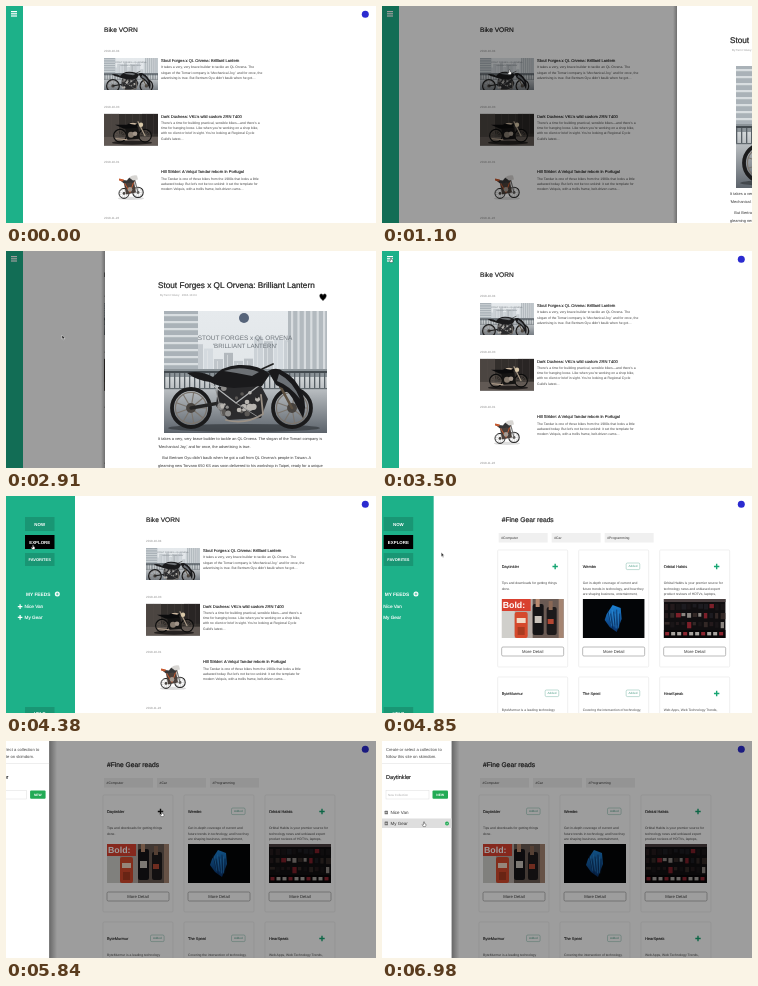
An HTML page for the animation above (8.32 s loop, 370 by 217 pixels).

```html
<!DOCTYPE html>
<html lang="en">
<head>
<meta charset="utf-8">
<title>Feed reader</title>
<style>
html, body { margin: 0; width: 100%; height: 100%; overflow: hidden; background: #fff; }
svg { display: block; }
#stage { width: 100vw; height: 100vh; }
text { font-family: "Liberation Sans", Arial, sans-serif; text-rendering: geometricPrecision; white-space: pre; }
</style>
</head>
<body>
<svg id="stage" viewBox="0 0 370 217" preserveAspectRatio="none"></svg>
<script>
const GREEN = '#1db189', PLUS = '#17a673';

// Markup helpers
const text = (x, y, size, str, fill = '#333', more = '') =>
  `<text x="${x}" y="${y}" font-size="${size}" fill="${fill}" ${more}>${str}</text>`;
const medium = (x, y, size, str, fill = '#222') =>
  text(x, y, size, str, fill, `stroke="${fill}" stroke-width="${size * 0.028}"`);
const mid = (x, y, size, str, fill, more = '') =>
  text(x, y, size, str, fill, `text-anchor="middle" ${more}`);
const lines = (x, y, step, size, rows, fill) =>
  rows.map((s, i) => text(x, y + i * step, size, s, fill)).join('');
const rect = (x, y, w, h, fill, more = '') =>
  `<rect x="${x}" y="${y}" width="${w}" height="${h}" fill="${fill}" ${more}/>`;
const circle = (x, y, r, fill, more = '') =>
  `<circle cx="${x}" cy="${y}" r="${r}" fill="${fill}" ${more}/>`;
const path = (d, fill, more = '') => `<path d="${d}" fill="${fill}" ${more}/>`;
const line = (d, color, w) => path(d, 'none', `stroke="${color}" stroke-width="${w}" stroke-linecap="round"`);
const group = (id, body, more = '') => `<g id="${id}" ${more}>${body}</g>`;
const repeat = (n, fn) => Array.from({ length: n }, (_, i) => fn(i)).join('');
const picture = (x, y, w, h, vw, vh, body) =>
  `<svg x="${x}" y="${y}" width="${w}" height="${h}" viewBox="0 0 ${vw} ${vh}" preserveAspectRatio="xMidYMid slice">${body}</svg>`;

let seed = 7;
const rnd = () => (seed = seed * 16807 % 2147483647) / 2147483647;

function wheel(x, y, r, tyre, rim) {
  return circle(x, y, r, 'none', `stroke="${tyre}" stroke-width="${r * 0.2}"`) +
    circle(x, y, r * 0.82, 'none', `stroke="${rim}" stroke-width="${r * 0.06}"`) +
    repeat(9, i => {
      const a = i * Math.PI * 2 / 9;
      return line(`M${x} ${y}l${r * 0.82 * Math.cos(a)} ${r * 0.82 * Math.sin(a)}`, rim, r * 0.06);
    }) + circle(x, y, r * 0.26, '#47433f');
}

function cityBike() {
  const towers = repeat(17, i => {
    const h = 16 + rnd() * 26, g = 178 + Math.round(rnd() * 34);
    return rect(i * 10, 66 - h, 9, h, `rgb(${g},${g + 6},${g + 11})`) +
      rect(i * 10 + 3, 68 - h, 1, h, '#e4e8ea', 'opacity=".6"');
  });
  const engine = repeat(26, () => {
    const x = 56 + rnd() * 38, y = 76 + rnd() * 28;
    return circle(x, y, 1.2 + rnd() * 2.6, ['#8d8c8a', '#2a2929', '#5b5855', '#b9b6b1'][Math.floor(rnd() * 4)]);
  });
  return rect(0, 0, 163, 122, 'url(#sky)') + towers +
    rect(0, 0, 34, 64, '#aab2b8') + rect(124, 0, 39, 64, '#b3babf') +
    repeat(9, i => rect(0, 3 + i * 7, 34, 2.2, '#d9dee1')) +
    repeat(6, i => rect(127 + i * 6.4, 0, 2.2, 64, '#d8dcdf')) +
    rect(0, 58, 163, 8, '#8b9398') + rect(0, 66, 163, 56, 'url(#road)') +
    repeat(33, i => rect(i * 5, 61, 1.3, 17, '#575f65')) +
    rect(0, 60, 163, 2, '#434a4f') + rect(0, 77, 163, 1.2, '#636b70') +
    circle(80, 7, 5, '#56647a') +
    mid(81, 29, 6.45, 'STOUT FORGES x QL ORVENA', '#6d747a') +
    mid(81, 36.6, 6.2, "'BRILLIANT LANTERN'", '#6d747a') +
    '<ellipse cx="80" cy="117" rx="76" ry="4" fill="#34383c" opacity=".7"/>' +
    wheel(27, 97, 19, '#1b1b1c', '#7b756e') + wheel(128, 97, 19, '#1b1b1c', '#7b756e') +
    line('M27 97L56 92L66 82', '#242424', 3.4) + line('M128 97L108 60', '#5d5142', 2.6) +
    path('M54 76L96 73L104 88L97 107L64 109L52 95Z', '#2b2b2d') + engine +
    line('M62 109Q82 114 99 103L97 84', '#9b9186', 1.8) + line('M46 72L72 92L101 70', '#b4b6b7', 1.2) +
    line('M52 79L58 104M72 92L94 106', '#8c8c8c', 1) +
    path('M23 62Q36 59 49 66Q58 55 74 54Q94 53 106 63L98 75L70 77Q54 76 46 71Q34 70 23 62Z', '#1a1a1c') +
    path('M60 60Q76 54 95 61L88 65Q74 62 60 60Z', '#6d7175') +
    path('M104 60Q113 55 120 61Q132 66 139 84Q143 96 139 107L132 94Q126 79 112 74Z', '#19191b') +
    path('M115 63Q129 70 136 88Q126 75 113 70Z', '#6b7075') + line('M98 58L109 53', '#222', 1.8);
}

function darkBike() {
  return rect(0, 0, 54, 32, '#332f2c') + rect(0, 0, 15, 23, '#4b4541') + rect(38, 0, 16, 20, '#292524') +
    repeat(8, i => rect(i * 7, 0, 0.5, 22, '#5a524c', 'opacity=".5"')) + rect(0, 23, 54, 9, '#615954') +
    '<ellipse cx="28" cy="29" rx="20" ry="2" fill="#24201f"/>' +
    wheel(16, 22, 6.3, '#0c0c0c', '#6b6157') + wheel(41, 22, 6.3, '#0c0c0c', '#6b6157') +
    line('M41 22L34 8', '#a99a87', 1.2) + path('M21 14L34 13L36 25L23 26Z', '#151413') +
    circle(27, 21, 3, '#877c70') + circle(31, 20, 2.3, '#a3968a') +
    path('M11 11L23 11Q27 7 34 10L33 14L20 15Z', '#0b0b0c') +
    path('M25 10Q29 8 33 10L31 11Z', '#c9b59e') + circle(37, 11, 2.2, '#d8c7a8') +
    line('M23 26L12 25', '#b7a48f', 1);
}

function whiteBike() {
  return rect(0, 0, 54, 32, '#fff') + '<ellipse cx="27" cy="29" rx="13" ry="1.6" fill="#ddd"/>' +
    wheel(20, 24, 5, '#222', '#999') + wheel(34, 23, 5.2, '#222', '#999') +
    line('M34 23L30 8', '#777', 1.2) + path('M20 14L30 12L32 23L22 25Z', '#4a403b') +
    line('M20 13L26 23L30 12', '#c65a30', 1) + circle(26, 20, 2.3, '#a69b92') +
    path('M15 10L23 11Q26 6 32 8L30 13L20 14Z', '#353536') +
    path('M25 8Q29 5 33 6L34 10L29 11Z', '#d7d5d2') + path('M15 9L20 10L19 12L15 11Z', '#c65a30');
}

const TITLE = 'Stout Forges x QL Orvena: Brilliant Lantern';

const posts = [
  ['2018-10-04', TITLE, ['It takes a very, very brave builder to tackle an QL Orvena. The',
    'slogan of the Tomari company is ‘Mechanical Joy,’ and for once, the',
    'advertising is true. But Bertram Oyu didn’t baulk when he got…'], cityBike, 163, 122],
  ['2018-10-03', 'Dark Duchess: VKL’s wild custom ZRN T400', [
    'There’s a time for building practical, sensible bikes—and there’s a',
    'time for hanging loose. Like when you’re working on a shop bike,',
    'with no client or brief in sight. You’re looking at Regional Cycle', 'Guild’s latest…'], darkBike, 54, 32],
  ['2018-10-01', 'Hill Strider: A Velqui Tandar reborn in Portugal', [
    'The Tandar is one of those bikes from the 1980s that looks a little',
    'awkward today. But let’s not be too unkind: it set the template for',
    'modern Velquis, with a trellis frame, belt-driven cams…'], whiteBike, 54, 32]
];

const feed = () => medium(98, 26, 6.6, 'Bike VORN') +
  posts.map(([date, title, rows, pic, w, h], i) => {
    const y = i * 55.7;
    return text(98, 46 + y, 3, date, '#8a8a8a') + picture(98, 52 + y, 54, 32, w, h, pic()) +
      medium(155, 55.8 + y, 4.1, title) + lines(155, 62.3 + y, 5.2, 3.4, rows, '#444');
  }).join('') + text(98, 212.8, 3, '2018-11-26', '#8a8a8a');

const heart = 'M218 49.5C214 46.5 214.2 43 216.2 43Q217.4 43 218 44.4Q218.6 43 219.8 43C221.8 43 222 46.5 218 49.5Z';

const article = () => rect(-4, 0, 4, 217, 'url(#shade)') + rect(0, 0, 275, 217, '#fff') +
  medium(53, 37, 8.2, TITLE) + text(55, 45, 2.9, 'By Tarn Holvey   2018-10-04', '#999') +
  path(heart, 'none', 'id="heart" stroke="#222" stroke-width=".6"') +
  picture(59, 60, 163, 122, 163, 122, cityBike()) +
  lines(53, 189.4, 7.1, 3.92, [
    'It takes a very, very brave builder to tackle an QL Orvena. The slogan of the Tomari company is',
    '‘Mechanical Joy,’ and for once, the advertising is true.'], '#333') +
  lines(53, 208.4, 7.1, 3.92, [
    '    But Bertram Oyu didn’t baulk when he got a call from QL Orvena’s people in Taiwan. A',
    'gleaming new Torvano 650 KS was soon delivered to his workshop in Taipei, ready for a unique'], '#333');

// Explore page
const pics = [
  () => rect(0, 0, 62, 39, '#b5aaa4') + rect(0, 11, 13, 28, '#d0cfcb') + rect(31, 0, 31, 39, '#6a5a53') +
    rect(0, 0, 29, 12, '#d9402f') + text(1, 8.8, 8.8, 'Bold:', '#fff', 'font-weight="bold"') +
    rect(13, 13, 13, 26, '#d5492c', 'rx="2"') + rect(15, 19, 9, 5, '#f2d9c5') + rect(16, 28, 7, 8, '#a93b20') +
    rect(31, 5, 11, 31, '#151416', 'rx="2"') + rect(34, 0, 4, 8, '#b98b70') +
    rect(45, 8, 10, 28, '#1d1a1b', 'rx="2"') + rect(47, 2, 4, 9, '#8a6855') +
    rect(33, 17, 7, 7, '#c9c2ba') + rect(46, 20, 6, 5, '#b34733') + rect(57, 0, 5, 39, '#a58572'),
  () => rect(0, 0, 62, 39, '#030507') + path('M24 15L30 6L38 9L39 20L34 33L27 28L22 21Z', 'url(#glow)') +
    repeat(9, i => line(`M${25 + i * 1.5} ${11 + (i % 3) * 2}l${3 - i * 0.4} ${13 + (i % 4)}`, i % 2 ? '#3a9be0' : '#061b3c', 0.5)),
  () => rect(0, 0, 62, 39, '#100e10') + rect(0, 0, 62, 3, '#4a3f40') +
    repeat(33, i => rect(1 + (i % 11) * 5.6, 5 + Math.floor(i / 11) * 9, 3 + rnd() * 2, 2.5 + rnd() * 4,
      ['#241a1c', '#7c1f29', '#1c1b20', '#8b8580', '#332826', '#191517'][Math.floor(rnd() * 6)])) +
    rect(0, 31, 62, 8, '#080708') + repeat(10, i => rect(1.5 + i * 6, 33, 4, 3.4, i % 3 ? '#a8a39e' : '#8d2630'))
];

const cards = [
  ['Daytinkler', ['Tips and downloads for getting things', 'done.']],
  ['Wembo', ['Get in-depth coverage of current and', 'future trends in technology, and how they', 'are shaping business, entertainment,']],
  ['Orbital Habits', ['Orbital Habits is your premier source for', 'technology news and unbiased expert', 'product reviews of HDTVs, laptops,']],
  ['ByteMurmur', ['ByteMurmur is a leading technology']],
  ['The Spool', ['Covering the intersection of technology,']],
  ['HearSpeak', ['Web Apps, Web Technology Trends,']]
];

const plus = (x, y) => path(`M${x - 2.7} ${y}h5.4M${x} ${y - 2.7}v5.4`, 'none', `stroke="${PLUS}" stroke-width="1.4"`);
const badge = (x, y) => rect(x, y, 13.6, 6.6, '#fff', 'rx="1.3" stroke="#5da892" stroke-width=".4"') +
  mid(x + 6.8, y + 4.4, 3, 'Added', '#4b9c85');

const card = ([name, rows], i) => {
  const x = 101 + (i % 3) * 81, y = i > 2 ? 127 : 0;
  const mark = i === 0 ? group('add', plus(154.5, 70.5)) + group('added', badge(144.5, 67))
    : i % 3 === 2 ? plus(x + 53, 70.5 + y) : badge(x + 43.5, 67 + y);
  return rect(x - 4, 54 + y, 70, 117, '#fff', 'rx="1" stroke="#e6e6e6" stroke-width=".6"') +
    medium(x, 71.8 + y, 3.9, name) + mark + lines(x, 87.8 + y, 5.7, 3.35, rows, '#444') +
    (i > 2 ? '' : picture(x, 103, 62, 39, 62, 39, pics[i]())) +
    rect(x, 151 + y, 62, 9, '#fff', 'rx="1.3" stroke="#777" stroke-width=".5"') +
    mid(x + 31, 157.1 + y, 4.2, 'More Detail', '#333');
};

const explore = () => medium(101, 25.5, 6.7, '#Fine Gear reads') +
  ['#Computer', '#Car', '#Programming'].map((s, i) =>
    rect(98 + i * 53, 37, 49, 9.5, '#f0f0f0') + text(100.5 + i * 53, 43, 3.4, s, '#333')).join('') +
  cards.map(card).join('');

// Side menu
const button = (y, h, label, more = '') => rect(19, y, 29.5, h, '#199674', more) +
  mid(33.7, y + h / 2 + 1.6, 4.4, label, '#fff', 'font-weight="bold"');
const arrow = y => path(`M11.8 ${y}h4.6M14.1 ${y - 2.3}v4.6`, 'none', 'stroke="#fff" stroke-width="1.2"');

const menu = () => button(21, 14, 'NOW') + button(39, 14, 'EXPLORE', 'id="pick"') +
  rect(19, 57, 29.5, 13, '#199674') + mid(33.7, 65, 4, 'FAVORITES', '#fff', 'font-weight="bold"') +
  text(20, 99.8, 4.8, 'MY FEEDS', '#fff', 'font-weight="bold"') +
  circle(51.3, 98, 2.5, '#fff') + path('M49.9 98h2.8M51.3 96.6v2.8', 'none', `stroke="${GREEN}" stroke-width=".7"`) +
  arrow(110.6) + medium(18.5, 112.4, 4.7, 'Nice Van', '#fff') +
  arrow(121.4) + medium(18.5, 123.2, 4.7, 'My Gear', '#fff') + button(211, 13, 'HELP');

const bars = () => repeat(3, i => rect(5, 5 + i * 2.2, 6, 1.2, '#fff'));

// Collection panel
const folder = y => rect(2.6, y - 1.8, 3.4, 3.6, '#777', 'rx=".5"') + rect(3.3, y - 0.4, 2, 0.5, '#fff');
const panel = () => rect(69.5, 0, 8, 217, 'url(#edge)') + rect(0, 0, 69.5, 217, '#fff') +
  lines(4, 10.4, 6.7, 4.15, ['Create or select a collection to', 'follow this site on skimdom.'], '#444') +
  rect(0, 22, 69.5, 0.5, '#ddd') + medium(4, 37.6, 5.6, 'Daytinkler') +
  rect(4, 49.5, 43, 8.5, '#fff', 'stroke="#ddd" stroke-width=".5"') + text(6, 54.8, 3, 'New Collection', '#aaa') +
  rect(50.5, 49.5, 15.5, 8.3, '#22ab55', 'rx="1"') + mid(58.2, 54.8, 3.3, 'NEW', '#fff', 'font-weight="bold"') +
  rect(0, 77.5, 69.5, 9.5, '#dedede', 'id="row"') +
  folder(71.5) + text(8.5, 73.2, 4.5, 'Nice Van', '#333') + folder(82.4) + text(8.5, 84.1, 4.5, 'My Gear', '#333') +
  group('check', circle(65, 82.4, 2, '#22ab55') +
    path('M64 82.4l.8 .8l1.3-1.5', 'none', 'stroke="#fff" stroke-width=".5"'));

const gradient = (id, a, b, dir, oa = 1, ob = 1) => `<linearGradient id="${id}" x1="0" y1="0" ${dir}>` +
  `<stop stop-color="${a}" stop-opacity="${oa}"/><stop offset="1" stop-color="${b}" stop-opacity="${ob}"/></linearGradient>`;
const across = 'x2="1" y2="0"', down = 'x2="0" y2="1"';

const stage = document.getElementById('stage');
stage.innerHTML = '<defs>' + gradient('sky', '#e6eaed', '#dde2e5', down) + gradient('road', '#d3d7d9', '#5c636b', down) +
  gradient('shade', '#000', '#000', across, 0, 0.3) + gradient('edge', '#000', '#000', across, 0.35, 0) +
  gradient('glow', '#1c83d6', '#08306a', down) + '</defs>' +
  rect(0, 0, 370, 217, '#fff') + group('feed', feed()) + group('explore', explore()) +
  circle(359.3, 8.3, 3.5, '#2b2bd0') +
  rect(0, 0, 17, 217, GREEN, 'id="side"') + group('bars', bars()) + group('menu', menu()) +
  rect(0, 0, 370, 217, '#000', 'id="dim" opacity=".385"') +
  group('drawer', article()) + group('panel', panel()) +
  group('arrow', path('M0 0V4.2L1 3.3L1.7 4.9L2.4 4.5L1.7 3H3.1Z', '#222', 'stroke="#fff" stroke-width=".4"')) +
  group('hand', path('M-.5 -2.1Q0 -2.6 .5 -2.1V-.5L1.9 0V1.5L1.4 2.6H-.8L-1.9 .7L-1.4 .2L-.5 .8Z', '#fff', 'stroke="#222" stroke-width=".4"'));

const el = {};
stage.querySelectorAll('[id]').forEach(n => el[n.id] = n);

// Screen updates happen at these moments
const LOOP = 8320;
const ticks = [0, 440, 1100, 1250, 1490, 1660, 1870, 2320, 2470, 2620, 2760, 2910, 3200,
  3500, 3680, 3850, 4030, 4210, 4380, 4530, 4670, 4850, 5030, 5210, 5390,
  5690, 5860, 6020, 6190, 6360, 6530, 6980];

const drawerX = [[440, 370], [1100, 295], [1490, 99]];
const sideW = [[3500, 17], [4030, 69], [4670, 69], [5210, 17]];
const panelX = [[5390, -73], [5860, 0]];
const mouseX = [[440, 127.5], [1250, 127.5], [1490, 298], [1870, 317], [2320, 317], [2910, 56], [3200, 56],
  [3500, 9], [3680, 9], [4210, 27], [4670, 27], [5390, 156], [5690, 156], [6530, 42]];
const mouseY = [[440, 66], [1250, 66], [1490, 54], [1870, 47], [2320, 47], [2910, 84], [3200, 84],
  [3500, 9], [3680, 9], [4210, 46], [4380, 51], [4670, 51], [5390, 73], [5690, 73], [6530, 83]];

function at(keys, t) {
  const i = keys.findIndex(k => k[0] > t);
  if (i === 0) return keys[0][1];
  if (i < 0) return keys[keys.length - 1][1];
  const [t0, a] = keys[i - 1], [t1, b] = keys[i];
  return a + (b - a) * (t - t0) / (t1 - t0);
}

const within = (t, a, b) => t >= a && t < b;
const show = (id, on) => el[id].setAttribute('visibility', on ? 'visible' : 'hidden');
const move = (id, x, y = 0) => el[id].setAttribute('transform', `translate(${x} ${y})`);

function draw(now) {
  const t = ticks.filter(k => k <= now % LOOP).pop();
  const reading = within(t, 1100, 3200), picking = t >= 5690, exploring = t >= 4670;
  const w = at(sideW, t), open = (w - 17) / 52;

  el.side.setAttribute('width', w);
  show('bars', open === 0);
  show('menu', open > 0);
  move('menu', w - 69);
  el.pick.setAttribute('fill', t >= 4210 ? '#000' : '#199674');

  el.feed.style.display = exploring ? 'none' : '';
  el.explore.style.display = exploring ? '' : 'none';
  move('feed', 42 * open);
  move('explore', 28 * open);
  show('add', t < 6980);
  show('added', t >= 6980);
  el.add.firstChild.setAttribute('stroke', within(t, 5390, 5860) ? '#111' : PLUS);

  show('dim', reading || picking);
  show('drawer', reading);
  move('drawer', at(drawerX, t));
  el.heart.setAttribute('fill', t >= 2320 ? '#000' : 'none');

  show('panel', picking);
  move('panel', at(panelX, t));
  el.row.setAttribute('visibility', t >= 6530 ? 'inherit' : 'hidden');
  el.check.setAttribute('visibility', t >= 6980 ? 'inherit' : 'hidden');

  const pointing = within(t, 440, 1490) || within(t, 1870, 2470) || within(t, 3500, 4670) || t >= 5390;
  const x = at(mouseX, t), y = at(mouseY, t);
  show('hand', t >= 440 && pointing);
  show('arrow', t >= 440 && !pointing);
  move('hand', x, y);
  move('arrow', x, y);
}

const start = performance.now();
function frame() {
  draw(performance.now() - start);
  requestAnimationFrame(frame);
}
frame();
</script>
</body>
</html>
```
